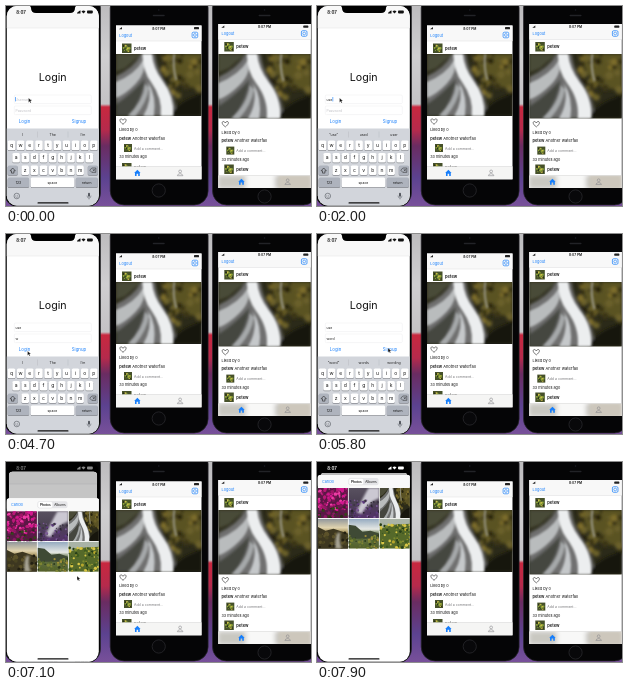
Animation of 305x200 px, one loop 8000 ms. Source, as an HTML page:

```html
<!DOCTYPE html>
<html lang="en">
<head>
<meta charset="utf-8">
<title>Photo sharing app</title>
<style>
html, body { margin: 0; width: 100%; height: 100%; overflow: hidden; background: #000; }
svg { display: block; width: 305px; height: 200px; font-family: Inter, Roboto, sans-serif; }
</style>
</head>
<body>
<svg id="stage" viewBox="0 0 305 200" xmlns="http://www.w3.org/2000/svg"></svg>
<script>
const LOOP = 8000, BLUE = '#167efb', USER = 'petew';
const stage = document.getElementById('stage');

// Markup helpers
const rect = (x, y, w, h, fill, r = 0, extra = '') =>
  `<rect x="${x}" y="${y}" width="${w}" height="${h}" rx="${r}" fill="${fill}" ${extra}/>`;
const circle = (x, y, r, fill, extra = '') =>
  `<circle cx="${x}" cy="${y}" r="${r}" fill="${fill}" ${extra}/>`;
const path = (d, fill, extra = '') => `<path d="${d}" fill="${fill}" ${extra}/>`;
const line = (d, color, w, extra = '') =>
  `<path d="${d}" fill="none" stroke="${color}" stroke-width="${w}" ${extra}/>`;
const text = (x, y, s, size, fill = '#111', extra = '') =>
  `<text x="${x}" y="${y}" font-size="${size}" fill="${fill}" ${extra}>${s}</text>`;
const mid = 'text-anchor="middle"', bold = 'font-weight="600"';
const gradient = (id, stops) =>
  `<linearGradient id="${id}" x1="0" y1="0" x2="0" y2="1">` +
  stops.map(([o, c]) => `<stop offset="${o}" stop-color="${c}"/>`).join('') + '</linearGradient>';

function rng(seed) {
  return () => (seed = (seed * 16807) % 2147483647) / 2147483647;
}
function specks(seed, n, x, y, w, h, size, colors) {
  const r = rng(seed);
  let out = '';
  for (let i = 0; i < n; i++) {
    const c = colors[Math.floor(r() * colors.length)];
    out += circle((x + r() * w).toFixed(1), (y + r() * h).toFixed(1), (size * (.5 + r())).toFixed(1), c);
  }
  return out;
}

const waterfall = `<symbol id="falls" viewBox="0 0 88 62" preserveAspectRatio="none">
  ${rect(0, 0, 88, 62, '#2b2a19')}
  <g filter="url(#blur)">
    ${path('M0 0H26L10 14L0 18Z', '#4a4b38')}
    ${path('M46 0H88V36L62 30Z', '#5a5224')}
    ${specks(41, 40, 48, 0, 40, 42, 2.6, ['#6b6129', '#332d14', '#7d6d2b', '#3a3516', '#25220f'])}
    ${path('M0 22Q18 14 26 0H40Q42 18 54 34Q62 46 62 62H0Z', '#6f7070')}
    ${path('M56 62Q64 46 88 40V62Z', '#17160d')}
    ${path('M0 50Q18 38 30 24Q28 44 14 62H0Z', '#45463f')}
  </g>
  <g filter="url(#soft)">
    ${path('M0 28Q20 20 28 6Q32 18 20 30Q10 40 0 44Z', '#b9bcbd')}
    ${path('M27 0H37Q38 14 48 27Q60 42 59 62H46Q48 44 36 28Q28 18 27 0Z', '#eceeef')}
    ${path('M33 28Q42 42 39 62H28Q38 46 33 28Z', '#c5c8ca')}
    ${path('M30 30Q28 48 12 62H20Q32 48 34 34Z', '#a6a9aa')}
    ${line('M60 0Q58 12 62 26', '#9a9886', 2)}
  </g>
</symbol>`;

const defs = `<defs>
  <filter id="soft"><feGaussianBlur stdDeviation="1"/></filter>
  <filter id="blur"><feGaussianBlur stdDeviation="1.6"/></filter>
  <filter id="haze"><feGaussianBlur stdDeviation="2"/></filter>
  ${gradient('desk', [[0, '#bdbcbe'], [.25, '#cfced0'], [.49, '#c4c2c5'], [.505, '#c8283f'], [.62, '#b52a4c'], [.7, '#6a2c62'], [.86, '#5c4290'], [1, '#78509a']])}
  ${gradient('dusk', [[0, '#8f959b'], [.3, '#e0d3ae'], [.45, '#a8955f'], [1, '#2c2718']])}
  ${gradient('sky', [[0, '#93a9bf'], [.35, '#e6e8e4'], [.5, '#61734b'], [1, '#54602a']])}
  ${gradient('rock', [[0, '#595160'], [.5, '#4a4152'], [1, '#54336a']])}
  <clipPath id="screen">${rect(.8, 0, 92, 199.5, '#fff', 10)}</clipPath>
  <clipPath id="card">${rect(0, 0, 94, 210, '#fff', 4, 'id="cardEdge"')}</clipPath>
  <clipPath id="tile">${rect(0, 0, 30.4, 30, '#fff')}</clipPath>
  ${waterfall}
</defs>`;

function avatar(x, y, size = 9.5) {
  return `<g transform="translate(${x} ${y}) scale(${size / 10})">` + rect(0, 0, 10, 10, '#46512a') +
    specks(9, 18, 1.3, 1.3, 7.4, 7.4, 1, ['#91a83a', '#252c17', '#cfbe4b', '#5f772d']) + '</g>';
}
function house(x, y) {
  return path(`M${x - 3.2} ${y}L${x} ${y - 3.1}L${x + 3.2} ${y}H${x + 2.4}V${y + 3}H${x + .8}V${y + .8}H${x - .8}V${y + 3}H${x - 2.4}V${y}Z`, BLUE);
}
function person(x, y) {
  return circle(x, y - 1.5, 1.4, 'none', 'stroke="#8b8b8f" stroke-width=".6"') +
    line(`M${x - 2.8} ${y + 2.8}Q${x - 2.4} ${y + .8} ${x} ${y + .8}T${x + 2.8} ${y + 2.8}Z`, '#8b8b8f', .6);
}

// One phone with a home button, showing the feed
function feedPhone({ x, w, top, photoH, bottom, home, tab, footY, haze }) {
  const cx = x + w / 2, left = x + 3.2, right = x + w, below = 48 + photoH;
  const frame = rect(x - 5.8, -12, w + 12.4, 211, '#050506', 14, 'stroke="#29282d" stroke-width=".7"') +
    rect(cx - 6, 8.8, 12, 1.4, '#222327', .7) + circle(cx, 4, .8, '#1b1d25') +
    circle(cx, home, 6.6, '#08080a', 'stroke="#29292d" stroke-width=".8"');
  const header = rect(x, top, w, bottom - top, '#fff') + rect(x, top, w, 15.5, '#f8f8f8') +
    text(cx, top + 4, '8:07 PM', 3.3, '#111', mid + ' ' + bold) +
    rect(right - 7.5, top + 1.6, 5, 2.2, '#222', .6) + path(`M${x + 3} ${top + 3.8}l3-2.2v2.2z`, '#222') +
    text(left, top + 11.1, 'Logout', 3.9, BLUE) +
    rect(right - 9.4, top + 6.7, 5.6, 5.6, 'none', 1.3, `stroke="${BLUE}" stroke-width=".7"`) +
    circle(right - 6.6, top + 9.5, 1.4, 'none', `stroke="${BLUE}" stroke-width=".6"`) +
    line(`M${x} ${top + 15.5}h${w}`, '#d5d5d7', .4);
  const nameRow = y => avatar(x + 6, y) + text(x + 18, y + 6.2, USER, 4.1, '#111', bold);
  const hx = x + 7, hy = below + 5.6;
  const post = nameRow(top + 18) +
    `<use href="#falls" x="${x}" y="48" width="${w}" height="${photoH}"/>` +
    line(`M${hx} ${hy + 2.7}C${hx - 6} ${hy - 1.8} ${hx - 1.8} ${hy - 4.5} ${hx} ${hy - 1.3}C${hx + 1.8} ${hy - 4.5} ${hx + 6} ${hy - 1.8} ${hx} ${hy + 2.7}Z`, '#222', .6) +
    text(left, below + 15, 'Liked by 0', 3.8) +
    text(left, below + 23.6, `<tspan ${bold}>${USER}</tspan> Another waterfall`, 4) +
    avatar(x + 8, below + 28, 8) +
    text(x + 18, below + 33.5, 'Add a comment...', 3.5, '#77777a') +
    text(left, below + 42, '33 minutes ago', 3.8);
  const blurred = haze
    ? `<svg x="${x}" y="${tab}" width="${w}" height="${bottom - tab}"><g filter="url(#haze)" opacity=".32">` +
      rect(0, 0, w, 13, '#6d6958') + rect(28, -2, 28, 17, '#fff') + rect(60, -2, 34, 17, '#796849') + '</g></svg>'
    : '';
  const bar = rect(x, tab, w, bottom - tab, '#f5f5f4') + blurred +
    line(`M${x} ${tab}h${w}`, '#c7c7c8', .4) +
    house(x + w / 4, (tab + bottom) / 2) + person(x + w * .75, (tab + bottom) / 2);
  return frame + header + post + nameRow(footY) + bar;
}

// Keyboard
function key(x, y, w, label, size = 5, fill = '#fff') {
  return rect(x, y + .7, w, 9.6, '#888b91', 1.5) + rect(x, y, w, 9.6, fill, 1.5) +
    text(x + w / 2, y + 6.4, label, size, '#151515', mid);
}
function keyRow(letters, x, y) {
  return [...letters].map((c, i) => key(x + i * 9.15, y, 7.6, c)).join('');
}
const GREY_KEY = '#aeb3bd';
const keyboard = `<g id="keys">` + rect(0, 122.5, 94, 80, '#d2d5db') +
  line('M31.5 125.5v6M62 125.5v6', '#b3b6bc', .4) +
  [16.5, 46.7, 77].map(x => text(x, 129.6, '', 3.5, '#222', mid + ' class="hint"')).join('') +
  keyRow('qwertyuiop', 1.7, 134.6) + keyRow('asdfghjkl', 6.3, 147) + keyRow('zxcvbnm', 15.4, 159.4) +
  key(1.7, 159.4, 10, '', 5, GREY_KEY) + key(81.8, 159.4, 10, '', 5, GREY_KEY) +
  line('M6.7 162l-2.6 2.8h1.4v2.3h2.4v-2.3h1.4z', '#222', .6) +
  line('M83.8 164.2l2-2.2h4v4.4h-4zM86.8 163.1l2 2.2m0-2.2l-2 2.2', '#222', .5) +
  key(1.7, 171.6, 21.4, '123', 3.4, GREY_KEY) + key(24.7, 171.6, 43.5, 'space', 3.4) +
  key(69.8, 171.6, 22, 'return', 3.4, GREY_KEY) +
  circle(10.8, 190, 2.8, 'none', 'stroke="#555960" stroke-width=".6"') +
  line('M9.4 190.6q1.4 1.7 2.8 0', '#555960', .5) + circle(9.9, 189.2, .4, '#555960') + circle(11.7, 189.2, .4, '#555960') +
  rect(82, 186.8, 2, 4, '#555960', 1) + line('M81 189.6q0 2.4 2 2.4t2-2.4M83 192v1.4', '#555960', .5) + '</g>';

const field = y => rect(8.3, y, 77, 8.6, '#fff', 1, 'stroke="#ececee" stroke-width=".5"');
const login = rect(0, 0, 94, 210, '#fff') + rect(0, 0, 94, 22, '#f8f8f8') + line('M0 22h94', '#d9d9db', .4) +
  text(46.7, 74.6, 'Login', 10.7, '#111', mid) + field(89) + field(100) +
  text(9.5, 94.7, '', 3.4, '#222', 'id="user"') + text(9.5, 105.7, '', 3.4, '#222', 'id="pass"') +
  rect(9, 91, .6, 4.4, BLUE, 0, 'id="caret"') +
  text(18.5, 116.6, 'Login', 4.4, BLUE, mid) + text(73, 116.6, 'Signup', 4.4, BLUE, mid) + keyboard;

// Photo picker tiles, each drawn in a 30.4 by 30 box
const tiles = [
  rect(0, 0, 31, 30, '#5b1745') + specks(3, 110, 0, 0, 31, 22, 1.3, ['#d3178f', '#a01667', '#ee3ea5', '#7a1453', '#b91978']) +
    specks(5, 50, 0, 19, 31, 12, 1.3, ['#37431f', '#5a1a4c', '#8c1a63', '#2a2c18']),
  rect(0, 0, 31, 30, 'url(#rock)') + path('M20 0H31V10Q20 14 13 26L8 24Q14 10 20 0Z', '#cbc8d2', 'filter="url(#soft)"') +
    specks(8, 60, 0, 12, 31, 18, 1, ['#5c3a7c', '#2b2530', '#7d5a98', '#3c3344']),
  '<use href="#falls" width="31" height="30"/>',
  rect(0, 0, 31, 30, 'url(#dusk)') + path('M0 8L8 12L16 10L31 15V30H0Z', '#3d3720') +
    specks(12, 40, 0, 14, 31, 16, 1.3, ['#5c522a', '#221f12', '#4a4422']) +
    path('M20 14Q17 20 18 30H24Q21 20 23 14Z', '#a9a595', 'filter="url(#soft)"'),
  rect(0, 0, 31, 30, 'url(#sky)') + path('M0 6L7 7L14 13L22 12L31 15V20H0Z', '#3f4a35') +
    specks(14, 60, 0, 17, 31, 13, 1.1, ['#2d3a1c', '#7d8433', '#a08f37', '#55672c']),
  rect(0, 0, 31, 30, '#55692a') + path('M0 0H31V5L14 6L0 10Z', '#a9b3a6') +
    specks(22, 75, 0, 6, 31, 24, 1.1, ['#b5a62c', '#263e17', '#7b8a2d', '#d8c646', '#3c591e'])
].map((art, i) =>
  `<g transform="translate(${.5 + i % 3 * 31} ${13 + Math.floor(i / 3) * 30.7})"><g clip-path="url(#tile)">${art}</g></g>`).join('');

const sheet = `<g id="sheet">` + rect(0, 0, 94, 210, '#fff', 4) + rect(0, 0, 94, 13, '#f9f9f9', 4) +
  text(5, 8, 'Cancel', 3.7, BLUE) +
  rect(31.5, 3, 30, 7.2, '#e5e5e8', 1.8) + rect(32, 3.4, 14.6, 6.4, '#fff', 1.6, 'stroke="#d2d2d5" stroke-width=".3"') +
  text(39.3, 7.7, 'Photos', 3.2, '#111', mid + ' ' + bold) + text(54, 7.7, 'Albums', 3.2, '#111', mid) +
  tiles + '</g>';

const status = `<g id="status">` + text(15, 7.8, '8:07', 4.4, 'currentColor', mid + ' ' + bold) +
  rect(81, 4.6, 5.8, 2.8, 'currentColor', .8) + path('M75.5 5.5q2-2 4 0l-2 2z', 'currentColor') +
  path('M71 7.4v-.8h.9v-.8h.9v-.8h.9v-.5h.8v2.9z', 'currentColor') + '</g>';

stage.innerHTML = defs + rect(0, 0, 305, 200, 'url(#desk)') +
  rect(-1.5, -12, 96, 213, '#040405', 14, 'stroke="#29292d" stroke-width=".6"') +
  `<g clip-path="url(#screen)">${rect(0, 0, 94, 200, '#000')}` +
  `<g id="page"><g clip-path="url(#card)">${login}${rect(0, 0, 94, 210, '#000', 0, 'id="shade"')}</g></g>` +
  sheet + rect(31.5, 196.2, 31, 1.3, '#111', .6) + '</g>' +
  path('M22 -1H72Q69 0 69 2Q69 7 64 7H30Q25 7 25 2Q25 0 22 -1Z', '#000') + status +
  feedPhone({ x: 110, w: 85.5, top: 19.5, photoH: 62, bottom: 173.3, home: 184.5, tab: 160.5, footY: 157 }) +
  feedPhone({ x: 212.3, w: 92.5, top: 18, photoH: 64.6, bottom: 182, home: 190.5, tab: 169.5, footY: 158.5, haze: true }) +
  path('M0 0V4.4L1.1 3.5L1.9 5.1L2.7 4.7L2 3.1H3.4Z', '#111', 'id="pointer" stroke="#fff" stroke-width=".3"');

const $ = id => document.getElementById(id);
const [user, pass, caret, keys, page, cardEdge, shade, picker, bar, pointer] =
  ['user', 'pass', 'caret', 'keys', 'page', 'cardEdge', 'shade', 'sheet', 'status', 'pointer'].map($);
const hints = [...document.querySelectorAll('.hint')];

// [start, text] steps
const userSteps = [[0, ''], [800, 'u'], [1000, 'us'], [1300, 'use']];
const passSteps = [[0, ''], [4600, 'w'], [4900, 'wo'], [5200, 'wor'], [5400, 'word']];
const hintSteps = [
  [0, 'I|The|I’m'], [1000, '“us”|use|just'], [1300, '“use”|used|user'],
  [2500, 'I|The|I’m'], [4900, '“wo”|would|won’t'], [5200, '“wor”|work|word'], [5400, '“word”|words|wording']
];
// [time, x, y] stops
const pointerStops = [[0, 22.5, 92], [2200, 22.5, 92], [2500, 22, 103], [2700, 22, 103], [3000, 21.5, 117], [5400, 21.5, 117], [5750, 71, 114], [LOOP, 71, 114]];

const stepAt = (steps, t) => steps.filter(s => s[0] <= t).pop()[1];
const span = (t, a, b) => Math.min(1, Math.max(0, (t - a) / (b - a)));
const easeOut = u => 1 - (1 - u) ** 3;
const easeInOut = u => u * u * (3 - 2 * u);

function pointerAt(t) {
  const i = pointerStops.findIndex(s => s[0] > t);
  const [a, ax, ay] = pointerStops[i - 1], [b, bx, by] = pointerStops[i];
  const u = easeInOut(span(t, a, b));
  return [ax + (bx - ax) * u, ay + (by - ay) * u];
}

function setField(el, value, hint) {
  el.textContent = value || hint;
  el.setAttribute('fill', value ? '#222' : '#c3c3c7');
}

function draw(t) {
  const name = stepAt(userSteps, t), secret = stepAt(passSteps, t);
  setField(user, name, 'Username');
  setField(pass, secret, 'Password');
  const inPass = t >= 2500, active = inPass ? pass : user, value = inPass ? secret : name;
  caret.setAttribute('x', 9.3 + (value ? active.getComputedTextLength() + .5 : 0));
  caret.setAttribute('y', inPass ? 102 : 91);
  caret.setAttribute('opacity', t % 1000 < 600 ? 1 : 0);
  stepAt(hintSteps, t).split('|').forEach((s, i) => hints[i].textContent = s);

  // The picker rises while the login page shrinks into a dim card behind it
  const u = span(t, 6800, 7400), open = easeOut(u);
  keys.setAttribute('transform', `translate(0 ${80 * open})`);
  page.setAttribute('transform', `translate(${3.3 * open} 0) scale(${1 - .07 * open} 1)`);
  cardEdge.setAttribute('y', 11 * open);
  shade.setAttribute('opacity', .26 * open);
  picker.setAttribute('transform', `translate(0 ${200 - 187 * open})`);
  const tone = Math.round(17 + 238 * u);
  bar.setAttribute('color', `rgb(${tone},${tone},${tone})`);

  const [px, py] = pointerAt(t);
  pointer.setAttribute('transform', `translate(${px} ${py})`);
  pointer.setAttribute('opacity', t < 7500 ? 1 : 0);
}

const start = performance.now();
function tick() {
  draw((performance.now() - start) % LOOP);
  requestAnimationFrame(tick);
}
tick();
</script>
</body>
</html>
```
